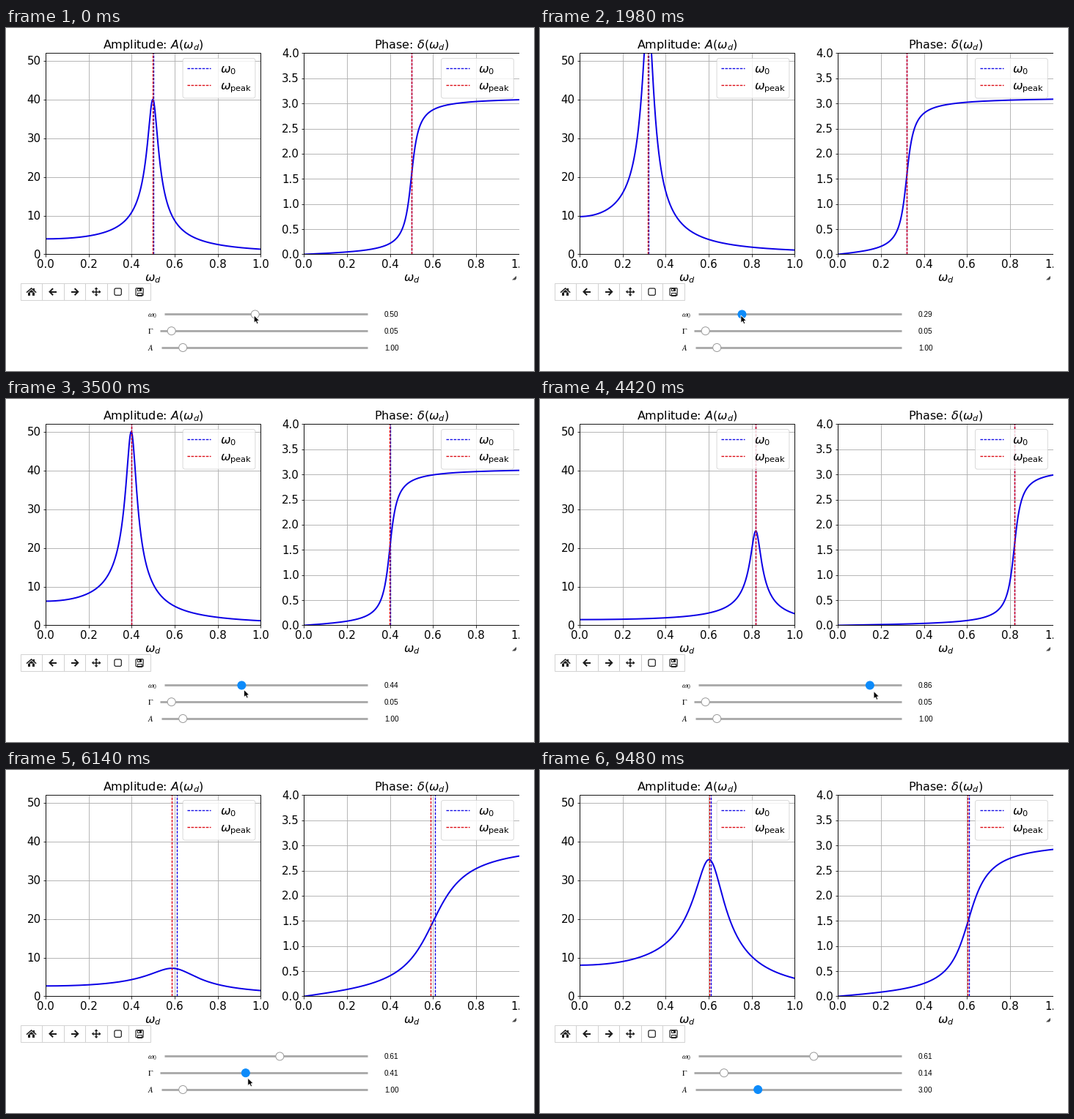
These frames come from a looping animation (720 by 469 pixels, 9.5 s). A matplotlib script:

```python
import numpy as np
import matplotlib.pyplot as plt
from matplotlib.animation import FuncAnimation
from matplotlib.patches import Circle, FancyBboxPatch, Polygon, Rectangle

W, H, DPI = 720, 469, 72          # at 72 dpi one point is one pixel
STEP, LOOP = 20, 9500
LAG = 160                         # the plots trail the sliders by this many ms
TOP, BOTTOM, PLOT_W = 34.5, 309.5, 293.4
BLUE, RED, GRID, TRACK = "#0c00e6", "#dc0010", "#b0b0b0", "#aaaaaa"
ACTIVE, ICON = "#0d8bfa", "#1c1c1c"

fig = plt.figure(figsize=((W + 1e-6) / DPI, (H + 1e-6) / DPI), dpi=DPI, facecolor="white")
ax = fig.add_axes([0, 0, 1, 1])
ax.set_xlim(0, W)
ax.set_ylim(H, 0)
ax.axis("off")


def ease(t, keys):
    """Cosine easing through (time, value...) keys, held at both ends."""
    if t <= keys[0][0]:
        return np.array(keys[0][1:], float)
    for (t0, *a), (t1, *b) in zip(keys, keys[1:]):
        if t < t1:
            p = (1 - np.cos(np.pi * (t - t0) / (t1 - t0))) / 2
            return (1 - p) * np.array(a) + p * np.array(b)
    return np.array(keys[-1][1:], float)


def text(x, y, s, size, ha="center", **kw):
    return ax.text(x, y, s, fontsize=size, ha=ha, va="baseline", **kw)


def line(x, y, color=ICON, lw=1.0, **kw):
    return ax.plot(x, y, color=color, lw=lw, **kw)[0]


def shape(points, color=ICON):
    return ax.add_patch(Polygon(points, fc=color, lw=0))


def rect(x, y, w, h, fc="none", ec="none", lw=0.9, **kw):
    return ax.add_patch(Rectangle((x, y), w, h, fc=fc, ec=ec, lw=lw, **kw))


def round_rect(x, y, w, h, r, **kw):
    return ax.add_patch(FancyBboxPatch((x, y), w, h,
                                       boxstyle=f"round,pad=0,rounding_size={r}", **kw))


class Plot:
    """One framed plot with grid, legend, curve and two marker lines."""

    def __init__(self, left, title, y_max, y_ticks, fmt):
        self.left, self.y_max = left, y_max
        right, mid = left + PLOT_W, left + PLOT_W / 2
        xs = left + PLOT_W * np.arange(6) / 5
        ys = self.to_y(y_ticks)
        ax.vlines(xs, TOP, BOTTOM, color=GRID, lw=0.9, zorder=1)
        ax.hlines(ys, left, right, color=GRID, lw=0.9, zorder=1)
        ax.vlines(xs, BOTTOM, BOTTOM + 3.2, color="black", lw=0.8, zorder=1)
        ax.hlines(ys, left - 3.2, left, color="black", lw=0.8, zorder=1)
        frame = rect(left, TOP, PLOT_W, BOTTOM - TOP, ec="black", zorder=4)
        for i, x in enumerate(xs):
            text(x, 327.5, f"{i / 5:.1f}", 15)
        for v, y in zip(y_ticks, ys):
            text(left - 6.2, y + 5.4, fmt.format(v), 15, "right")
        text(mid + 0.3, 28, title, 16)
        text(mid, 346.5, r"$\omega_d$", 16)

        self.curve = line([], [], BLUE, 2, zorder=2)
        dash = dict(lw=1.35, ls=(0, (2.6, 1.15)), dash_capstyle="butt")
        self.marks = [line([], [], c, zorder=3, **dash) for c in (BLUE, RED)]
        for art in (self.curve, *self.marks):
            art.set_clip_path(frame)

        round_rect(left + 187.2, 41.5, 98.8, 54.5, 3, fc="white", ec="#cccccc",
                   lw=0.9, alpha=0.8, zorder=5)
        rows = ((BLUE, r"$\omega_0$"), (RED, r"$\omega_\mathrm{peak}$"))
        for i, (color, label) in enumerate(rows):
            y = 55 + 23.5 * i
            line([left + 193.2, left + 225.4], [y, y], color, zorder=6, **dash)
            text(left + 237.8, y + 6, label, 16.2, "left", zorder=6)

    def to_y(self, v):
        return BOTTOM - (BOTTOM - TOP) * np.asarray(v) / self.y_max

    def update(self, w, values, marks):
        self.curve.set_data(self.left + PLOT_W * w, self.to_y(values))
        for art, m in zip(self.marks, marks):
            x = self.left + PLOT_W * m
            art.set_data([x, x], [BOTTOM, TOP])


class Slider:
    """A slider dragged through eased (time, value) keys."""

    def __init__(self, label, y, start, zero, scale, keys):
        self.y, self.zero, self.scale, self.keys = y, zero, scale, keys
        self.grab, self.release = keys[0][0], keys[-1][0]
        line([start, 493], [y, y], TRACK, 2.9, solid_capstyle="butt")
        text(193, y + 3.5, label, 10.8, "left", math_fontfamily="stix")
        self.knob = ax.add_patch(Circle((0, y), 5.5, lw=1, zorder=4))
        self.readout = text(516, y + 3.8, "", 10, "left", family="Liberation Sans")

    def at(self, t):
        return round(float(ease(t, self.keys)[0]), 2)

    def x(self, t):
        return self.zero + self.scale * self.at(t)

    def update(self, t, active):
        self.knob.center = (self.x(t), self.y)
        self.knob.set(fc=ACTIVE if active else "white", ec=ACTIVE if active else "#9c9c9c")
        self.readout.set_text(f"{self.at(t):.2f}")


def toolbar():
    y = 360.7
    xs = 34.6 + 29.5 * np.arange(6)
    for x in xs:
        rect(x - 14.7, 349, 29.5, 23.3, "white", "#cfcfcf")
    home, back, forward, move, zoom, save = xs

    line([home - 6, home, home + 6], [y + 0.5, y - 4.8, y + 0.5], lw=1.5)
    shape([(home - 4.3, y + 1), (home, y - 2.7), (home + 4.3, y + 1)])
    for side in (-1, 1):
        rect(home + 2.75 * side - 1.55, y + 0.9, 3.1, 4.1, ICON)
    rect(home + 2.6, y - 5, 1.7, 3.5, ICON)

    for x, d in ((back, -1), (forward, 1)):
        line([x - 5 * d, x + 4 * d], [y, y], lw=2, solid_capstyle="butt")
        line([x, x + 4.6 * d, x], [y - 4.6, y, y + 4.6], lw=2,
             solid_joinstyle="miter", solid_capstyle="butt")

    for dx, dy in ((1, 0), (-1, 0), (0, 1), (0, -1)):
        along, across = np.array([dx, dy]), np.array([dy, dx])
        tip = np.array([move, y])
        line(*zip(tip, tip + 4.5 * along), lw=1.5)
        shape([tip + 6.2 * along, tip + 3.6 * along + 2.5 * across,
               tip + 3.6 * along - 2.5 * across])

    round_rect(zoom - 4.7, y - 4.7, 9.4, 9.4, 2, fill=False, ec=ICON, lw=1.2)
    round_rect(save - 5, y - 5, 10, 10, 1, fill=False, ec=ICON, lw=1.2)
    rect(save - 2.8, y + 1, 5.6, 4, ec=ICON, lw=1)
    rect(save - 2.8, y - 5, 4.8, 3.4, ec=ICON, lw=1)
    rect(save, y - 4.6, 1.8, 2.8, ICON)


amp = Plot(53.9, r"Amplitude: $A(\omega_d)$", 52, np.arange(0, 51, 10), "{:.0f}")
phase = Plot(406.3, r"Phase: $\delta(\omega_d)$", 4, np.arange(0, 4.1, 0.5), "{:.1f}")
rect(700, 0, 20, H, "white", zorder=8)
shape([(690, 344.5), (696, 339), (696, 342.5), (694.5, 344.5)], "#4a4a4a")
toolbar()

sliders = (
    Slider(r"$\omega_0$", 391.5, 215.5, 186.7, 306,
           [(800, .5), (2330, .26), (3236, .392), (4524, .868), (5240, .61)]),
    Slider(r"$\Gamma$", 414.2, 210, 211.6, 281, [(5712, .05), (6343, .52), (6960, .14)]),
    Slider(r"$A$", 437, 211.5, 213.2, 28, [(7296, 1), (7817, 5.2), (8800, 3)]),
)

# the pointer slips away from the knob it holds: time, dx, dy
GRIP = [(1980, -1.5, 1.3), (4420, 5.2, 8), (6140, 3, 7), (7700, 3.5, 3.5)]
ARROW = np.array([(0, 0), (0, 10.4), (2.4, 8.3), (4, 11.8), (5.8, 11), (4.3, 7.6), (7.4, 7.3)])
pointer = ax.add_patch(Polygon(ARROW, fc="black", ec="white", lw=0.8, zorder=9))

w = np.linspace(0, 1, 400)


def pointer_at(t):
    """Follow the held knob, gliding on to the next one between drags."""
    held = sum(ease(t, [(a.release, 0), (b.grab, 1)])[0] for a, b in zip(sliders, sliders[1:]))
    spot = [np.interp(held, range(3), c) for c in ([s.x(t) for s in sliders],
                                                   [s.y for s in sliders])]
    return np.array(spot) + ease(t, GRIP)


def draw(i):
    t = i * STEP
    active = sum(t >= s.grab for s in sliders) - 1
    for k, s in enumerate(sliders):
        s.update(t, k == active)
    w0, g, a = (s.at(t - LAG) for s in sliders)
    marks = (w0, np.sqrt(max(w0**2 - g**2 / 2, 0)))
    amp.update(w, a / np.hypot(w0**2 - w**2, g * w), marks)
    phase.update(w, np.arctan2(g * w, w0**2 - w**2), marks)
    pointer.set_xy(ARROW + pointer_at(t))
    pointer.set_visible(t < LOOP - 2 * STEP)
    return []


anim = FuncAnimation(fig, draw, frames=LOOP // STEP, interval=STEP, init_func=lambda: [],
                     repeat=True, repeat_delay=0, blit=False)
plt.show()
```
